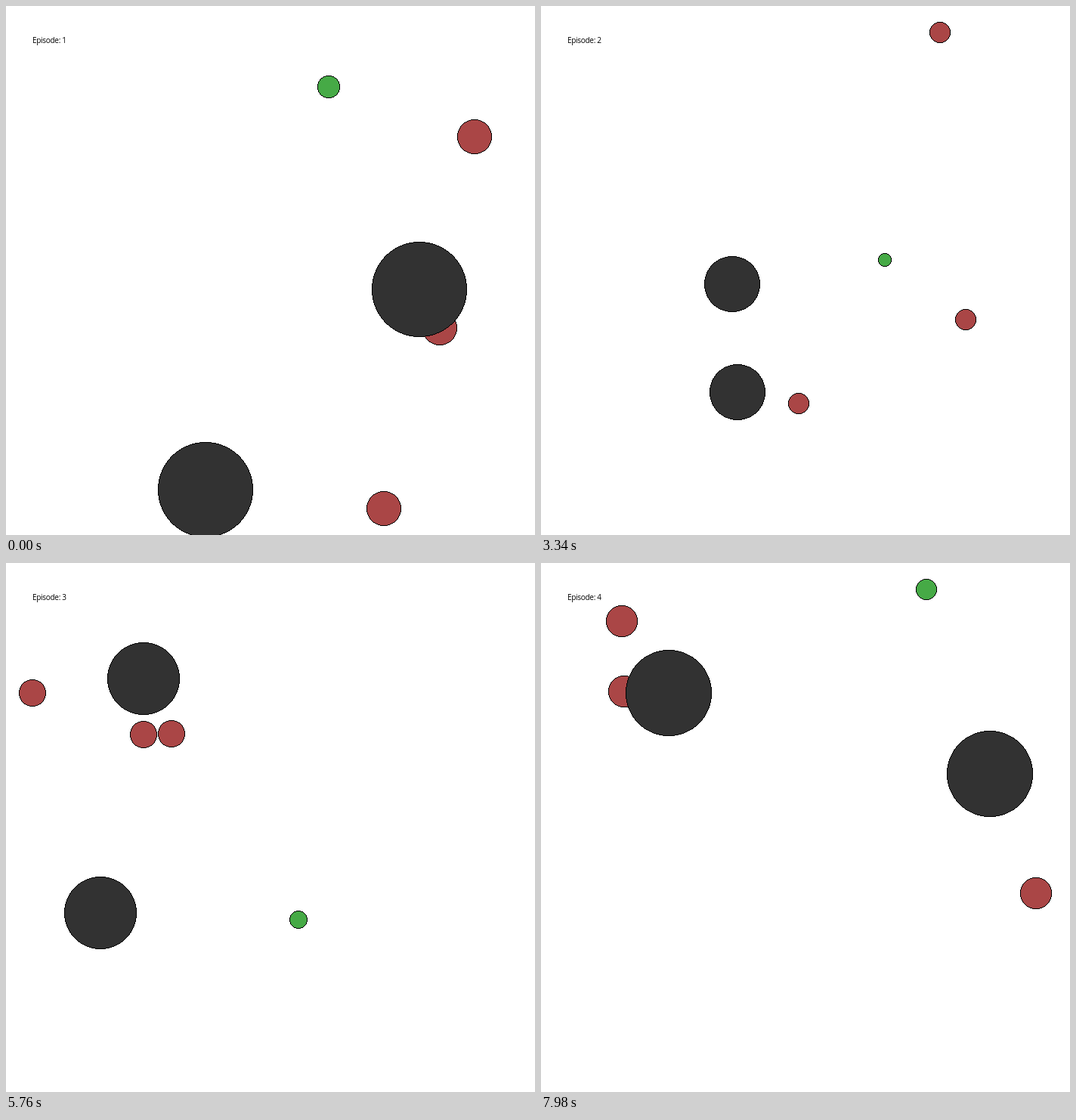
An HTML page with a canvas that plays this animation: 700x700 px, repeating every 8000 ms.

```html
<!DOCTYPE html>
<html lang="en">
<head>
<meta charset="utf-8">
<title>Pursuit episodes</title>
<style>
  html, body { margin: 0; width: 100%; height: 100%; overflow: hidden; background: #fff; }
  canvas { display: block; }
</style>
</head>
<body>
<canvas id="stage" width="700" height="700"></canvas>
<script>
const ctx = document.getElementById('stage').getContext('2d');
const LOOP = 8000, EPISODE = 2320, FIRST = 20, STEP = 100;
const HALF = 350, MARGIN = .9;
const RED = '#aa4646', GREEN = '#46aa46', DARK = '#323232';
const DRAG = .75;    // share of velocity kept each step
const TIRING = .9157; // prey effort kept each step
const HEADING = { up: [0, -1], right: [1, 0], left: [-1, 0] };

// Start points; each hunter keeps one heading, and a kick is a starting velocity.
const episodes = [
  {
    rocks: [[.622, .081], [-.2686, .915]],
    up: { at: [.85, -.553], power: .1195 },
    right: { at: [.7057, .242], power: .1068, kick: [.058, .131] },
    left: { at: [.474, .99], power: .0617 },
    prey: { at: [.245, -.763], flee: 'left', power: .0083 }
  },
  {
    rocks: [[-.509, .104], [-.471, .858]],
    up: { at: [.949, -.712], power: .1179 },
    right: { at: [.17, .351], power: .118 },
    left: { at: [.411, .939], power: .0562 },
    prey: { at: [.906, -.071], flee: 'left', power: .0591 }
  },
  {
    rocks: [[-.687, -.807], [-.9265, .471]],
    up: { at: [-.7174, .2647], power: .1094, kick: [-.2, 0] },
    right: { at: [-1.032, -.507], power: .0545 },
    left: { at: [-.151, -.501], power: .0589 },
    prey: { at: [1.011, .507], flee: 'left', power: .1353 }
  },
  {
    rocks: [[-.627, -.615], [.8526, -.2424]],
    up: { at: [-.767, .304], power: .114, kick: [-.022, 0] },
    right: { at: [.107, .305], power: .1175 },
    left: { at: [-.599, -.945], power: .03 },
    prey: { at: [.5584, -.8166], flee: 'up', power: .0477 }
  }
];

function travel({ at, power, kick = [0, 0] }, heading, steps, stamina = 1) {
  return at.map((p, axis) => {
    let v = kick[axis], push = power * (1 - DRAG) * HEADING[heading][axis];
    for (let i = 0; i < steps; i++) {
      v = v * DRAG + push;
      p += v;
      push *= stamina;
    }
    return p;
  });
}

const toPixel = share => Math.floor(HALF + Math.floor(share * HALF) * MARGIN);

// Hard-edged disc with a one-pixel black rim.
function disc([x, y], size, color, range) {
  const r = Math.floor(size * HALF * MARGIN / range);
  const cx = toPixel(x / range), cy = toPixel(y / range);
  const reach = i => Math.round(Math.sqrt(r * r - (i + .5) ** 2));
  ctx.fillStyle = color;
  for (let i = 0; i < r; i++) {
    const w = reach(i);
    ctx.fillRect(cx - w, cy + i, 2 * w, 1);
    ctx.fillRect(cx - w, cy - i - 1, 2 * w, 1);
  }
  ctx.fillStyle = '#000';
  for (let i = 0; i < reach(i); i++) {
    const j = reach(i) - 1;
    for (const [a, b] of [[i, j], [j, i]]) {
      for (const px of [cx + a, cx - a - 1]) {
        ctx.fillRect(px, cy + b, 1, 1);
        ctx.fillRect(px, cy - b - 1, 1, 1);
      }
    }
  }
}

function draw(time) {
  const index = Math.floor(time / EPISODE);
  const local = time - index * EPISODE;
  const steps = local < FIRST ? 0 : 1 + Math.floor((local - FIRST) / STEP);
  const scene = episodes[index];
  const { rocks, prey } = scene;
  const hunters = Object.keys(HEADING).map(name => travel(scene[name], name, steps));
  const runner = travel(prey, prey.flee, steps, TIRING);
  // The camera zooms so that the farthest body stays in view.
  const range = Math.max(...[...rocks, ...hunters, runner].flat().map(Math.abs));

  ctx.fillStyle = '#fff';
  ctx.fillRect(0, 0, 700, 700);
  hunters.forEach(p => disc(p, .075, RED, range));
  disc(runner, .05, GREEN, range);
  rocks.forEach(p => disc(p, .2, DARK, range));

  ctx.fillStyle = '#000';
  ctx.font = '10px "Open Sans", "Noto Sans", sans-serif';
  ctx.letterSpacing = '-0.3px';
  ctx.fillText('Episode: ' + (index + 1), 35, 49);
}

const begin = performance.now();
function tick() {
  draw((performance.now() - begin) % LOOP);
  requestAnimationFrame(tick);
}
tick();
</script>
</body>
</html>
```
